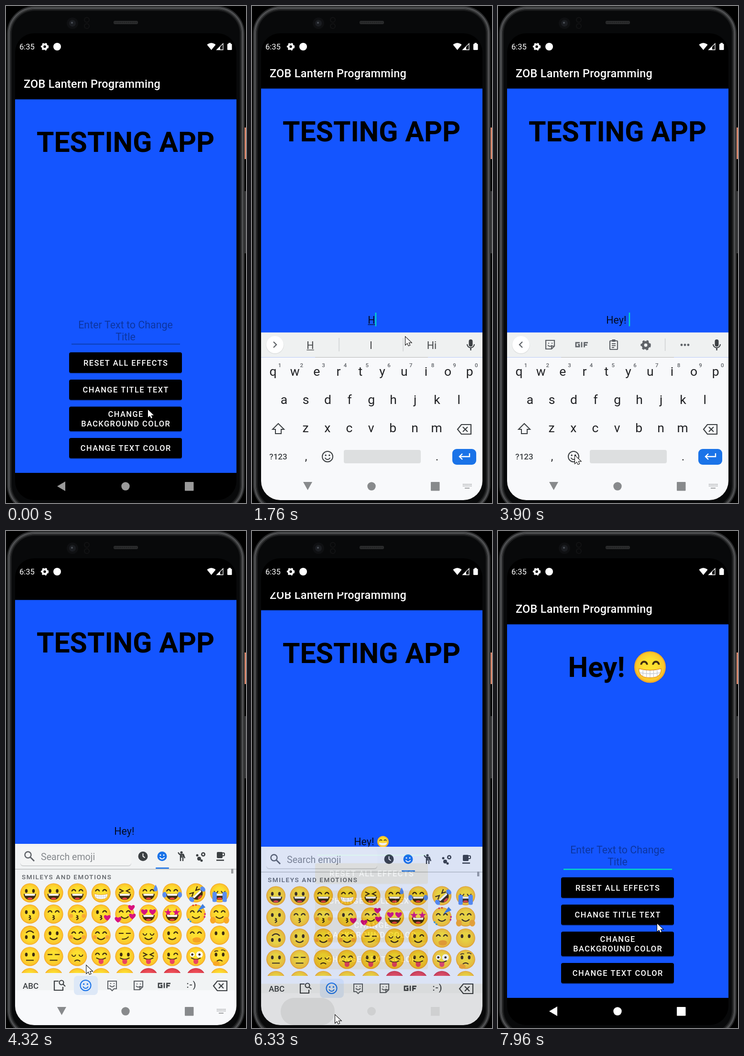
Recreate the animation shown at these times as an HTML page with a canvas. Size 502x1039 px, loop 8000 ms.

```html
<!DOCTYPE html>
<html lang="en">
<head>
<meta charset="utf-8">
<style>
html, body { margin: 0; width: 502px; height: 1039px; overflow: hidden; background: #000; }
canvas { display: block; }
</style>
</head>
<body>
<canvas id="stage" width="502" height="1039"></canvas>
<script>
const stage = document.getElementById('stage');
const screen2d = stage.getContext('2d'), layer2d = stage.cloneNode().getContext('2d');
const LOOP = 8000, BLUE = '#1455ff', INK = '#3c4043', GREY = '#5f6368', ACCENT = '#1a73e8', TEAL = '#03dac5';
let g = screen2d;

// Drawing helpers
function rect(x, y, w, h, color, r = 0) {
  g.fillStyle = color; g.beginPath(); g.roundRect(x, y, w, h, r); g.fill();
}
function oval(x, y, rx, ry, color) {
  g.fillStyle = color; g.beginPath(); g.ellipse(x, y, rx, ry, 0, 0, 7); g.fill();
}
const disc = (x, y, r, color) => oval(x, y, r, r, color);
function ring(x, y, r, color, w = 2, from = 0, to = 2 * Math.PI) {
  g.strokeStyle = color; g.lineWidth = w; g.beginPath(); g.arc(x, y, r, from, to); g.stroke();
}
function frame(x, y, w, h, r, color, width) {
  g.strokeStyle = color; g.lineWidth = width; g.beginPath(); g.roundRect(x, y, w, h, r); g.stroke();
}
function path(d, x, y, color, width = 0) {
  g.save(); g.translate(x, y);
  if (width) { g.strokeStyle = color; g.lineWidth = width; g.stroke(new Path2D(d)); }
  else { g.fillStyle = color; g.fill(new Path2D(d)); }
  g.restore();
}
function text(str, x, y, size, color, { weight = 400, align = 'center', gap = 0 } = {}) {
  g.font = `${weight} ${size}px Roboto, sans-serif`;
  g.letterSpacing = gap + 'px'; g.textAlign = align; g.fillStyle = color;
  g.fillText(str, x, y);
  return g.measureText(str).width;
}
function gear(x, y, r, color) {
  ring(x, y, r * .58, color, r * .5);
  g.setLineDash([r * .42, r * .43]); ring(x, y, r * .87, color, r * .3); g.setLineDash([]);
}

// Timing: the picture only changes at these moments [first, last, steps]
const RUNS = [[0, 0, 1], [150, 1050, 8], [1330, 1330, 1], [1760, 2280, 4], [2560, 2870, 3],
  [3240, 4170, 8], [4320, 5250, 8], [5370, 6330, 8], [6450, 7110, 6], [7390, 7960, 5]];
const STEPS = RUNS.flatMap(([a, b, n]) =>
  Array.from({ length: n }, (_, i) => Math.round((a + (b - a) * i / Math.max(1, n - 1)) / 10) * 10));
const snap = t => STEPS.filter(s => s <= t).pop();

function tween(keys, t) {
  const i = keys.findIndex(k => k[0] > t);
  if (i < 0) return keys.at(-1).slice(1);
  const [a, b] = [keys[i - 1], keys[i]], f = (t - a[0]) / (b[0] - a[0]);
  return a.slice(1).map((v, j) => v + (b[j + 1] - v) * f);
}
const POINTER = [[0, 297, 844], [30, 297, 844], [670, 321, 692], [3120, 321, 692], [3640, 161, 940],
  [4180, 161, 940], [4980, 203, 760], [5520, 203, 760], [6070, 174, 1012], [6340, 174, 1012], [7110, 333, 821]];
const SCROLL = [[0, 0], [800, 0], [920, 9.5], [1620, 9.5], [1760, 22.5], [3910, 22.5], [4040, 30],
  [4170, 42], [4320, 51], [6210, 51], [6330, 29.5], [6450, 0]];
const PANEL = [[0, 0], [800, 0], [920, .94], [1050, 1], [6210, 1], [6330, .9], [6450, 0]];
const TYPED = [[0, ''], [1760, 'H'], [2110, 'He'], [2560, 'Hey'], [2710, 'Hey!'], [2870, 'Hey! '], [7600, '']];

// Emoji: code is eyes, mouth, then extras
const HEART = 'M0 6C-12-2-6-9 0-4C6-9 12-2 0 6z', STAR = 'M0-8 2-2 8-2 3 2 5 8 0 4-5 8-3 2-8-2-2-2z';
const DARK = '#3d2b12', PINK = '#d8127d', TEAR = '#5a8df0', HAND = '#f9a825';
const EYES = {
  o: x => oval(x, -4, 2.8, 4, DARK),
  '^': x => ring(x, -3, 3.8, DARK, 2.4, Math.PI, 2 * Math.PI),
  u: x => ring(x, -4, 3.8, DARK, 2, 0, Math.PI),
  x: x => path(x < 0 ? 'M-4-4 4 0-4 4' : 'M4-4-4 0 4 4', x, -4, DARK, 2.2),
  '-': x => path('M-5 0H5', x, -4, DARK, 2.2),
  h: x => path(HEART, x * 1.15, -4, PINK),
  '*': x => path(STAR, x * 1.15, -4, PINK),
  z: x => { disc(x, -4, x < 0 ? 5 : 7, '#fff'); disc(x, -4, 2.4, DARK); },
  w: x => EYES[x < 0 ? 'o' : '^'](x)
};
const MOUTHS = {
  D() {
    path('M-13 2H13C12 19-12 19-13 2z', 0, 0, DARK);
    path('M-11 2H11L10 6H-10z', 0, 0, '#fff');
    oval(0, 12, 5.5, 2.2, '#e8453c');
  },
  G() {
    const d = 'M-14 2Q0 6 14 2Q15 13.5 0 13.5Q-15 13.5-14 2z';
    path(d, 0, 0, '#fff');
    path('M-13 7Q0 10 13 7M-9 4V11M-4.5 4V12.5M0 4V13M4.5 4V12.5M9 4V11', 0, 0, '#c4c8cc', .8);
    path(d, 0, 0, '#e59a2c', .9);
  },
  P() {
    path('M-10 3Q0 9 10 3', 0, 0, DARK, 2);
    path('M-5 6V11a5 5 0 0 0 10 0V6z', 0, 0, '#ea4560');
  },
  k() { path('M-2 3q6 1 1 4q6 2-1 5', 0, 0, DARK, 2.2); },
  ')'() { path('M-8 5Q0 13 8 5', 0, 0, DARK, 2.2); },
  '('() { path('M-6 10Q0 5 6 10', 0, 0, DARK, 2); },
  _() { path('M-8 8H8', 0, 0, DARK, 2); },
  s() { path('M-6 8Q3 9 8 3', 0, 0, DARK, 2); },
  '.'() {}
};
const EXTRAS = {
  b() { for (const x of [-13, 13]) disc(x, 4, 4, '#f5863a90'); },
  t() { for (const x of [-16, 16]) oval(x, 4, 4.5, 6, TEAR); },
  c() { for (const x of [-15, 6]) rect(x, -2, 9, 21, TEAR, 3); },
  S() { path('M0-8Q8 5 0 6Q-8 5 0-8z', 15, -9, TEAR); },
  K() { path(HEART, 13, 8, PINK); },
  H() { for (const [x, y] of [[-14, 12], [14, -13], [16, 5]]) path(HEART, x, y, PINK); },
  p() {
    path('M-9 5 2-10 8-3z', 12, -11, '#3f7fe0');
    for (let i = 0; i < 6; i++) disc(19 * Math.cos(i * 2.2), 19 * Math.sin(i * 2.2), 1.8, [PINK, '#2e9be6', '#e53935'][i % 3]);
  },
  n() { for (const x of [-14, 14]) oval(x, 13, 6, 7, HAND); },
  m() { oval(2, 10, 9, 6, HAND); path('M-7 8H10M-6 12H9', 0, 0, '#e58a1c', 1); },
  q() { oval(-7, 15, 7, 5, HAND); path('M-11-10Q-7-13-3-11M3-13Q8-15 12-11', 0, 0, DARK, 1.6); }
};
const FACES = `oD oD ^D ^G xD ^DS ^Dt xDtr uDc ok ^k ^kb wkK ^)H hD *D ^)p ^)n
  o)f o) ^)b ^)b -s u) w) ^.m o. o_ -_ u( ^P oP xP wP zP o(q
  o. o. u. o. x. -.R -.R -.R o.`.split(/\s+/);

function face(code, x, y, r) {
  const [eyes, mouth, ...extras] = code;
  g.save(); g.translate(x, y); g.scale(r / 20, r / 20);
  if (extras.includes('f')) g.rotate(Math.PI);
  if (extras.includes('r')) g.rotate(-.75);
  const skin = g.createRadialGradient(0, -3, 8, 0, 0, 20), red = extras.includes('R');
  skin.addColorStop(0, red ? '#f0505a' : '#fde030');
  skin.addColorStop(.8, red ? '#e0404c' : '#fbc72c');
  skin.addColorStop(1, red ? '#c62f3f' : '#f29f22');
  disc(0, 0, 20, skin);
  EYES[eyes](-7.5); EYES[eyes](7.5); MOUTHS[mouth]();
  for (const e of extras) EXTRAS[e]?.();
  g.restore();
}

// Icons
function smiley(x, y, r, color, solid) {
  if (solid) disc(x, y, r, color); else ring(x, y, r, color);
  const c = solid ? '#fff' : color;
  disc(x - r * .35, y - r * .25, r * .15, c); disc(x + r * .35, y - r * .25, r * .15, c);
  ring(x, y + r * .05, r * .5, c, 2, .3, Math.PI - .3);
}
function backspace(x, y) {
  path('M-14 0-6-10H14V10H-6zM-3-5 7 5M7-5-3 5', x, y, INK, 2.2);
}
function sticker(x, y) {
  path('M-9-9H9V3L3 9H-9zM9 3H3V9', x, y, GREY, 2.2);
  path('M-4-3h2M3-3h2M-5 1Q0 6 4 1', x, y, GREY, 2);
}
function gifLabel(x, y, color) {
  path('M-4-4.2H-12V4.2H-5V0H-8M0-5.5V5.5M5.5 5.5V-4.2H13M5.5 .7H11.5', x, y, color, 2.7);
}
function mic(x, y) {
  rect(x - 4, y - 11, 8, 15, INK, 4);
  ring(x, y - 1, 7.5, INK, 2, 0, Math.PI);
  rect(x - 1.2, y + 6, 2.4, 6, INK);
}

function phone() {
  rect(0, 0, 502, 1039, '#000');
  rect(499, 254, 3, 66, '#dd8a6e');
  rect(499, 387, 3, 130, '#3a3a3c');
  rect(2, 0, 497, 1059, '#08090a', 58);
  // Metal rim, bright in the middle and dark on both sides
  ['#2b2c2d', '#555658', '#3c3d3e', '#1c1d1e'].forEach((color, i) => {
    const d = 2.5 * i + 1.2;
    frame(2 + d, d, 497 - 2 * d, 1059 - 2 * d, 58 - d, color, 2.6);
  });
  disc(139, 36, 12, '#0f1012'); disc(139, 36, 7, '#1b1d21'); disc(138, 35, 2, '#4a4e55');
  ring(169, 29, 5, '#121314'); ring(169, 42, 5, '#121314');
  rect(225, 31, 51, 7, '#2a2b2c', 3);
  for (let x = 228; x < 275; x += 4) disc(x, 34.5, 1, '#1c1c1c');
}
function statusBar() {
  text('6:35', 28, 91, 16.5, '#fff', { align: 'left' });
  gear(81, 85, 8, '#fff');
  disc(107, 85, 8, '#fff');
  path('M0 14.5-9 3.5Q0-4 9 3.5z', 429.5, 77.5, '#fff');
  path('M0 13H13V0z', 441, 78.5, '#fff', 1.3);
  path('M0 14H8V6z', 440, 78, '#fff');
  rect(463, 79, 9.5, 13, '#fff', 1.5); rect(465.5, 77, 4.5, 3, '#fff');
}

function button(y, h, lines, pressed) {
  rect(132, y + 1.5, 236, h, '#0004', 4);
  rect(132, y, 236, h, pressed ? '#2c2c2c' : '#000', 4);
  const mid = y + h / 2 + 6 - (lines.length - 1) * 9.8;
  lines.forEach((s, i) => text(s, 250.7, mid + i * 19.6, 16.4, '#fff', { weight: 500, gap: 1.46 }));
}
function field(s) {
  const str = TYPED.filter(k => k[0] <= s).pop()[1], emoji = s > 5480 && str, black = '#000000dd';
  let end = 249;
  if (!str) {
    const hint = 'rgba(0,0,0,.37)';
    text('Enter Text to Change', 250, 673.5, 21.4, hint);
    text('Title', 250, 698.5, 21.4, hint);
  } else {
    const w = text(str, emoji ? 237 : 250, 686, 21.4, black);
    end = 250 + w / 2;
    if (emoji) { face('^G', 274, 679, 12); end = 287; }
    if (s < 2700) rect(250 - w / 2, 688, w, 1.2, black);
  }
  const blinkOn = s < 4300 ? s < 1330 || s > 1750 : s % 1000 > 500 && s < 7900;
  if (s > 900 && blinkOn) rect(end, 663.5, 2.5, 28.5, TEAL);
  const focused = s > 700;
  rect(137, 706, 227, focused ? 2.4 : 1.4, focused ? TEAL : '#0b399f');
}
function app(s, scroll) {
  g.save();
  g.beginPath(); g.rect(19, 128, 463, 848); g.clip();
  g.translate(0, -scroll);
  rect(19, 195, 463, 781, BLUE);
  rect(19, 195, 463, 1.5, '#0002');
  text('ZOB Lantern Programming', 37, 171, 23.4, '#fff', { weight: 500, align: 'left', gap: .3 });
  if (s > 7600) {
    text('Hey!', 206, 305, 59, '#000', { weight: 700 });
    face('^G', 318, 284.5, 33);
  } else text('TESTING APP', 250, 305, 59, '#000', { weight: 700 });
  field(s);
  button(724, 43, ['RESET ALL EFFECTS']);
  button(781, 42.5, ['CHANGE TITLE TEXT'], s > 7500 && s < 7900);
  button(837.5, 51.5, ['CHANGE', 'BACKGROUND COLOR']);
  button(903, 42.5, ['CHANGE TEXT COLOR']);
  g.restore();
}
function navShapes(color, back) {
  path(back, 0, 0, color);
  disc(250, 1004, 8.7, color);
  rect(374, 995, 18.5, 18.5, color, 1);
}

function toolbar(s, alpha) {
  rect(19, 682.5, 463, 52, '#eff1f1');
  const suggesting = s >= 1760 && s < 2860;
  disc(48, 709, 18.7, '#0001'); disc(48, 708, 18, '#fff');
  path(suggesting ? 'M-3-6 3 0-3 6' : 'M3-6-3 0 3 6', 48, 708, GREY, 2.3);
  mic(457.5, 708);
  if (suggesting) {
    const words = s < 2100 ? ['H', 'I', 'Hi'] : s < 2550 ? ['He', 'Her', 'Hey'] : ['Hey', 'Get', 'Heya'];
    words.forEach((w, i) => {
      const width = text(w, 122 + i * 127, 716.5, 21.5, '#444749');
      if (!i) rect(122 - width / 2, 718.5, width, 1.3, '#444749');
    });
    rect(181.5, 694, 1.2, 28, '#c8cacc'); rect(315.5, 694, 1.2, 28, '#c8cacc');
    return;
  }
  if (alpha < 1) rect(76, 682.5, 67, 52, '#0001');
  sticker(109, 708); gifLabel(175, 708, GREY);
  frame(234, 700, 16, 18, 1.5, GREY, 2.2);
  rect(238, 697, 8, 5, GREY, 2);
  path('M0 0H8M0 4H8M0 8H5', 238, 706, GREY, 1.8);
  gear(309, 709, 10.5, GREY);
  rect(349, 695, 1.2, 26, '#c8cacc');
  for (const x of [384, 391, 398]) disc(x, 708.5, 2.4, GREY);
}
function keyboard(s, alpha) {
  rect(19, 734.5, 463, 310, '#f8f9fb');
  toolbar(s, alpha);
  [['qwertyuiop', 44, 773], ['asdfghjkl', 67, 832], ['zxcvbnm', 112, 891]].forEach(([row, x0, y], r) => {
    [...row].forEach((ch, i) => {
      const x = x0 + i * 45.7;
      text(ch, x, y, 26.5, '#202124');
      if (!r) text((i + 1) % 10, x + 14, 754.5, 11.5, GREY, { weight: 500 });
    });
  });
  path('M0-11 12 1H6V10H-6V1H-12z', 55, 884, INK, 2);
  backspace(444, 885);
  text('?123', 55, 948, 17, INK, { weight: 500 });
  text(',', 113, 950, 23, '#202124'); text('.', 387, 950, 23, '#202124');
  smiley(158, 942, 11, INK);
  rect(192, 928, 161, 28, '#dddfe0', 4);
  rect(419, 926, 50, 33, ACCENT, 9);
  path('M11-6V1H-10M-4-5-10 1-4 7', 444, 941, '#fff', 2.4);
}
function emojiPanel() {
  rect(19, 654, 463, 306, '#f1f3f4');
  rect(19, 960, 463, 84, '#f8f9fb');
  rect(30, 662, 232, 39, '#0002', 6); rect(30, 660, 232, 39, '#f4f5f5', 6);
  ring(46, 677, 6.5, GREY, 2.4); path('M0 0 8 8', 51, 682, GREY, 2.8);
  text('Search emoji', 73, 688, 19.6, '#85898d', { align: 'left' });
  disc(286.5, 680, 10, INK); path('M0-6V0L4 3', 286.5, 680, '#fff', 1.8);
  smiley(326.5, 680, 10, ACCENT, true);
  disc(367, 672, 2.6, INK); path('M-7-8-4-4H4L7 4M-2-4V10M3-4V10M0-4V3', 367, 680, INK, 2.4);
  disc(404, 685, 4, INK); disc(400, 678, 2.5, INK); disc(409, 689, 2.5, INK);
  ring(412.5, 676, 3.2, INK, 2.6);
  rect(441, 671, 12, 13, INK, 2); frame(451, 673, 6, 6, 2, INK, 2); rect(440, 687, 16, 2.5, INK);
  rect(313, 703.5, 28, 2.5, ACCENT, 1);
  rect(19, 706, 463, 2, '#c9cccd');
  rect(471, 706, 4.5, 10, '#9a9c9e');
  text('SMILEYS AND EMOTIONS', 33, 728, 13.5, GREY, { weight: 500, align: 'left', gap: 1.6 });
  g.save();
  g.beginPath(); g.rect(19, 730, 463, 194); g.clip();
  FACES.forEach((code, i) => face(code, 50 + i % 9 * 49.6, 756.5 + Math.floor(i / 9) * 44.3, 20));
  g.restore();
  rect(142, 930, 50, 40, '#dde8f7', 8);
  text('ABC', 51.5, 956.5, 17, INK, { weight: 500 });
  path('M0-9H-9V10H9V3', 110, 950, INK, 2.2);
  ring(116, 944, 4.5, INK, 2.2); path('M0 0 5 5', 119, 947, INK, 2.2);
  smiley(166.5, 950, 11, ACCENT);
  path('M-9-9H9V7H4L0 11-4 7H-9z', 222, 950, GREY, 2);
  path('M-4-4h2M3-4h2M-5 0Q0 6 5 0', 222, 950, GREY, 2);
  sticker(277, 950); gifLabel(331, 950, INK);
  text(':-)', 388, 955, 19, INK, { weight: 500, gap: 1 });
  backspace(448, 951);
}
function inputMethod(s, scroll, alpha) {
  const emoji = s >= 4040;
  const drop = emoji && s < 4400 ? 51 - scroll : (1 - alpha) * (emoji ? 60 : 45);
  // Drawn on its own layer so that it fades as one piece
  g = layer2d;
  g.clearRect(0, 0, 502, 1039);
  if (emoji) emojiPanel(); else keyboard(s, alpha);
  g = screen2d;
  g.globalAlpha = alpha;
  g.drawImage(layer2d.canvas, 0, drop);
  g.globalAlpha = 1;
  if (s > 6150) {
    rect(60, 976, 113, 57, '#d0d1d2', 28);
    disc(250, 1004, 9, '#cfd0d1'); rect(374, 995, 18.5, 18.5, '#cfd0d1');
    return;
  }
  navShapes('#888a8c', 'M107 995H126L116.5 1012z');
  for (let i = 0; i < 14; i++) rect(441 + i % 7 * 2.8, 999 + Math.floor(i / 7) * 3.4, 1.6, 1.8, '#96989a');
  rect(445, 1007, 10, 1.8, '#96989a');
}

function draw(s) {
  const [scroll] = tween(SCROLL, s), [alpha] = tween(PANEL, s), [px, py] = tween(POINTER, s);
  phone();
  g.save();
  g.beginPath(); g.roundRect(19, 57, 463, 976, 40); g.clip();
  rect(19, 57, 463, 976, '#000');
  app(s, scroll);
  statusBar();
  if (alpha) inputMethod(s, scroll, alpha);
  else navShapes(s < 6400 ? '#9a9a9a' : '#fff', 'M107 1004 124 994V1014z');
  g.restore();
  const arrow = 'M0 0V16L4 12.5 6.5 18 9 17 6.5 11.5H12z';
  path(arrow, px, py, '#000', 2); path(arrow, px, py, '#fff');
}

let shown = -1;
function tick() {
  const s = snap(performance.now() % LOOP);
  if (s !== shown) draw(shown = s);
  requestAnimationFrame(tick);
}
tick();
</script>
</body>
</html>
```
